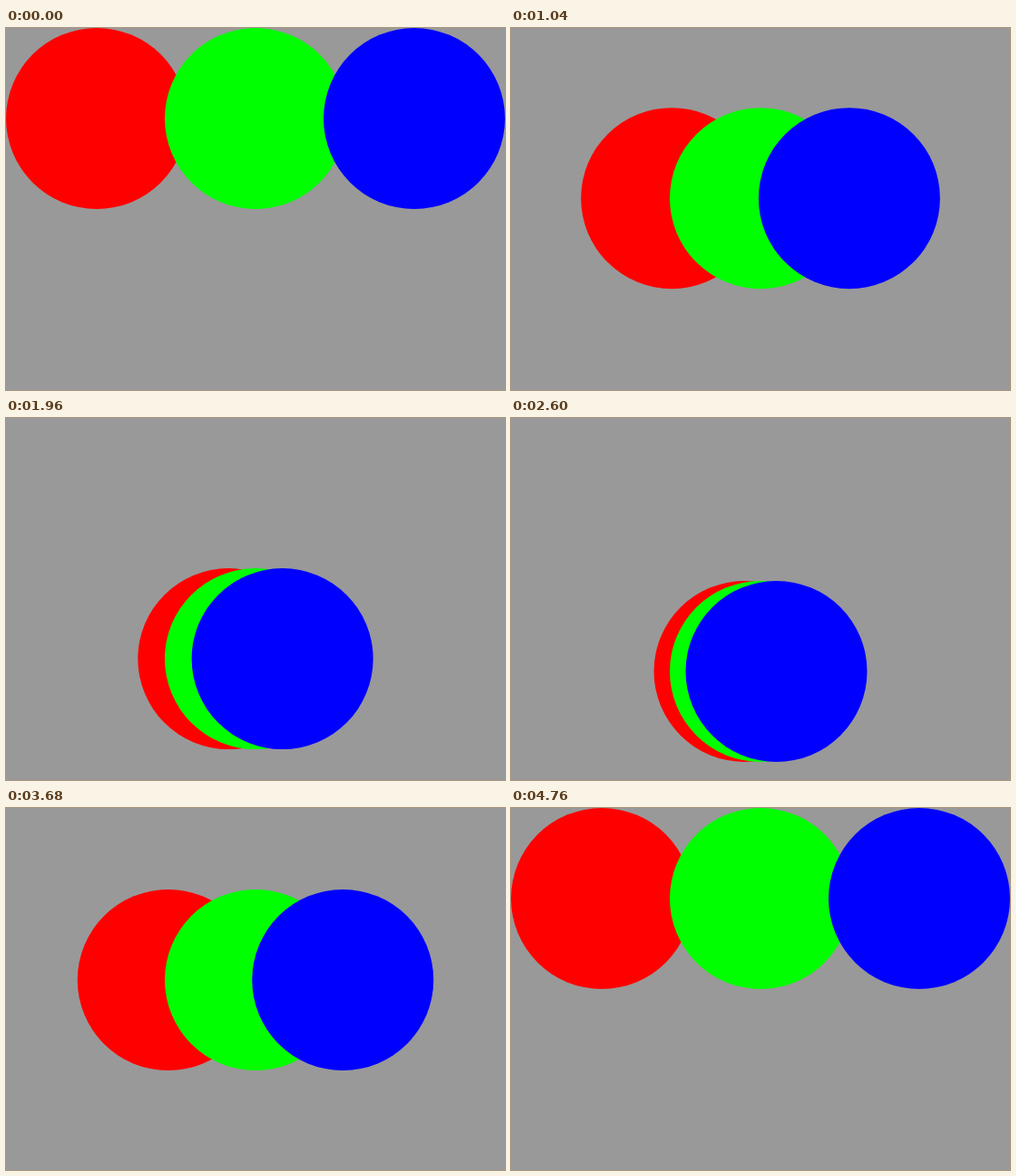
An HTML page that plays this animation: 550x400 px, repeating every 4800 ms.

```html
<!DOCTYPE html>
<html lang="en">
<head>
<meta charset="utf-8">
<title>Three circles</title>
<style>
  html, body { margin: 0; width: 100%; height: 100%; overflow: hidden; background: #999; }
  svg { display: block; width: 550px; height: 400px; }
</style>
</head>
<body>
<svg viewBox="0 0 550 400">
  <rect width="550" height="400" fill="#999"/>
  <circle id="red" cx="100" cy="100" r="100" fill="#f00"/>
  <circle id="green" cx="275" cy="100" r="100" fill="#0f0"/>
  <circle id="blue" cx="450" cy="100" r="100" fill="#00f"/>
</svg>
<script>
  const STEP = 40, COUNT = 120, TURN = 59;
  const [red, green, blue] = ['red', 'green', 'blue'].map(id => document.getElementById(id));

  function place(circle, x, y) {
    circle.setAttribute('cx', x);
    circle.setAttribute('cy', y);
  }

  // 0 = spread out at the top, 1 = gathered at the bottom
  function progress(tick) {
    return tick <= TURN ? tick / TURN : (COUNT - 1 - tick) / (COUNT - 1 - TURN);
  }

  function draw(ms) {
    const p = progress(Math.floor(ms / STEP) % COUNT);
    const y = 100 + 200 * p;
    const gap = 175 * (1 - p);
    place(red, 275 - gap, y);
    place(green, 275, y);
    place(blue, 275 + gap, y);
  }

  let start;
  function loop(now) {
    if (start === undefined) start = now;
    draw(Math.max(0, now - start));
    requestAnimationFrame(loop);
  }
  draw(0);
  requestAnimationFrame(loop);
</script>
</body>
</html>
```
